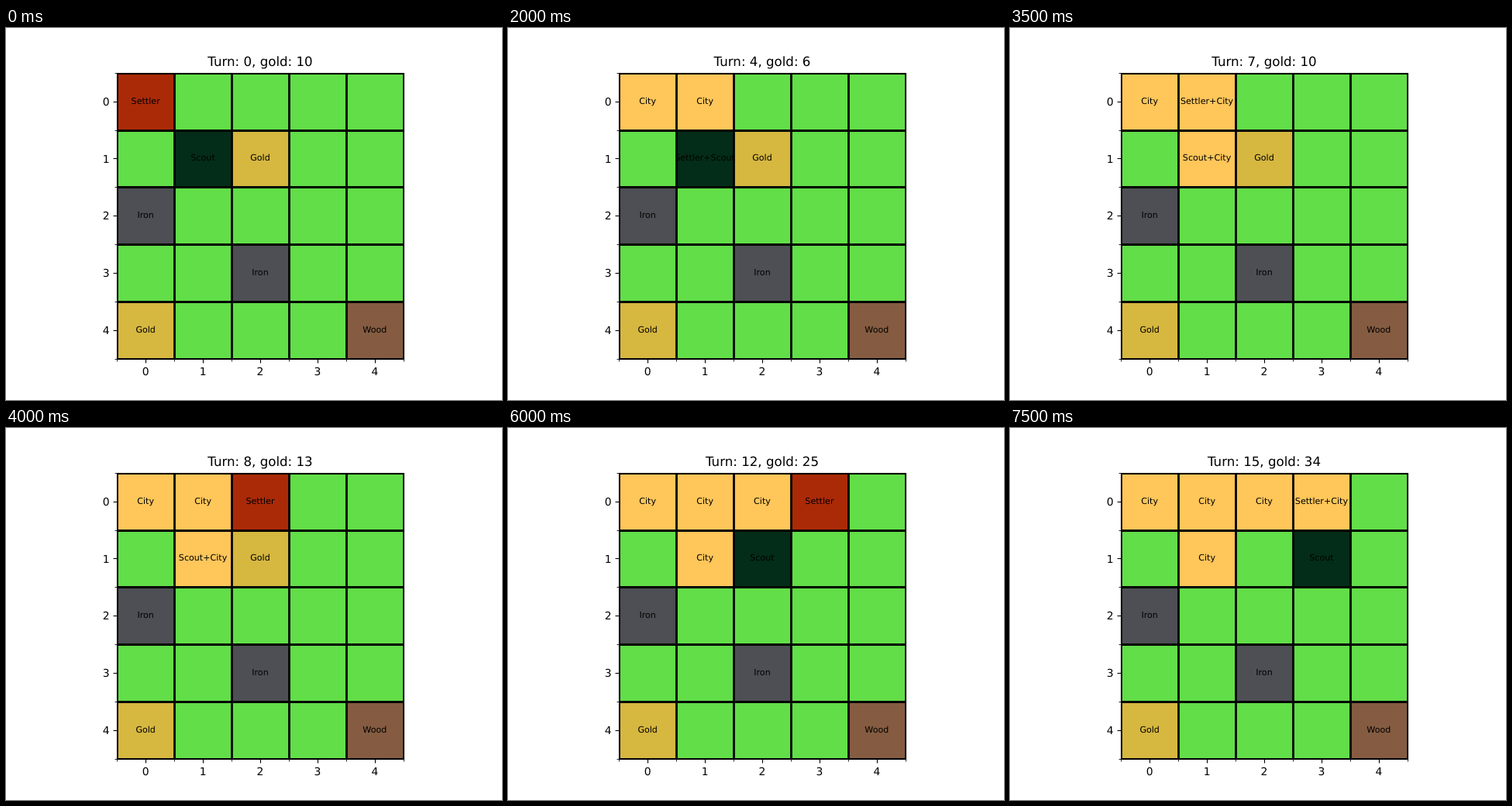
An HTML page that plays this animation: 640 by 480 pixels, repeating every 8000 ms.

```html
<!DOCTYPE html>
<html lang="en">
<head>
<meta charset="utf-8">
<title>Settlers on a grid</title>
<style>
  html, body { margin: 0; width: 100%; height: 100%; overflow: hidden; background: #fff; }
  svg { display: block; }
  text { font-family: "DejaVu Sans", sans-serif; fill: #000; text-rendering: geometricPrecision; white-space: pre; }
  .title { font-size: 16.667px; text-anchor: middle; }
  .tick { font-size: 13.889px; text-anchor: middle; }
  .side { text-anchor: end; }
  .label { font-size: 11.111px; text-anchor: middle; }
</style>
</head>
<body>
<svg id="stage" width="640" height="480" viewBox="0 0 640 480">
  <clipPath id="plot"><rect x="143" y="58" width="371" height="370"/></clipPath>
</svg>
<script>
const STEP = 500, TURNS = 16, N = 5;
const LEFT = 143.2, TOP = 57.6, CELL = 73.92;
const COLORS = {
  land: '#62de49', City: '#ffc65a', Scout: '#032d18', Settler: '#aa2a08',
  Gold: '#d6b740', Iron: '#4e4f54', Wood: '#855c41'
};

// Each entry: turn, row, column
const settlerPath = [[0, 0, 0], [2, 0, 1], [4, 1, 1], [6, 0, 1], [8, 0, 2], [12, 0, 3]];
const scoutPath = [[0, 1, 1], [11, 1, 2], [13, 1, 3]];
const cities = [[1, 0, 0], [3, 0, 1], [5, 1, 1], [9, 0, 2], [14, 0, 3]];
const resources = { '1,2': 'Gold', '2,0': 'Iron', '3,2': 'Iron', '4,0': 'Gold', '4,4': 'Wood' };
const MINED = 11, CITY_COST = 4;

const stage = document.getElementById('stage');

function add(tag, attrs, parent = stage) {
  const el = document.createElementNS('http://www.w3.org/2000/svg', tag);
  for (const key in attrs) el.setAttribute(key, attrs[key]);
  parent.appendChild(el);
  return el;
}

function line(x1, y1, x2, y2, width, parent) {
  return add('line', { x1, y1, x2, y2, stroke: '#000', 'stroke-width': width }, parent);
}

function write(x, y, cls, str = '') {
  const el = add('text', { x, y, class: cls });
  el.textContent = str;
  return el;
}

const snap = v => Math.round(v) + 0.5;
const xAt = c => LEFT + c * CELL;
const yAt = r => TOP + r * CELL;

const plot = add('g', { 'clip-path': 'url(#plot)' });
const cells = [];
for (let r = 0; r < N; r++) {
  for (let c = 0; c < N; c++) {
    const x = Math.round(143 + c * CELL), y = Math.round(57 + r * CELL);
    const rect = add('rect', { x, y, width: 74, height: 74 }, plot);
    cells.push({ r, c, rect });
  }
}

for (let i = 0; i <= N; i++) {
  const x = snap(xAt(i)), y = snap(yAt(i));
  line(x, 57, x, 429, 2.78, plot);
  line(142, y, 515, y, 2.78, plot);
  line(140.5, y, 143.5, y, 0.83);
  line(x, 427.5, x, 430.5, 0.83);
}
add('rect', { x: 143.5, y: 58.5, width: 370, height: 369, fill: 'none', stroke: '#000', 'stroke-width': 1.11 });

for (let i = 0; i < N; i++) {
  const x = xAt(i + 0.5), y = yAt(i + 0.5);
  line(138.5, snap(y), 143.5, snap(y), 1.11);
  line(snap(x), 427.5, snap(x), 432.5, 1.11);
  write(133.5, Math.round(y + 5.05), 'tick side', i);
  write(x, 448, 'tick', i);
}

for (const cell of cells) {
  cell.text = write(xAt(cell.c + 0.5), Math.round(yAt(cell.r + 0.5) + 3), 'label');
}
const title = write(328, 49, 'title');

// Every city pays one gold per turn from the turn after it was founded.
function goldAt(turn) {
  let gold = 10 + (turn >= MINED ? 1 : 0);
  for (const [founded] of cities) {
    if (turn >= founded) gold += turn - founded - CITY_COST;
  }
  return gold;
}

function isAt(path, turn, r, c) {
  const spot = path.filter(p => p[0] <= turn).pop();
  return spot[1] === r && spot[2] === c;
}

function namesIn(turn, r, c) {
  const names = [];
  if (isAt(settlerPath, turn, r, c)) names.push('Settler');
  if (isAt(scoutPath, turn, r, c)) names.push('Scout');
  if (cities.some(([t, cr, cc]) => t <= turn && cr === r && cc === c)) names.push('City');
  if (!names.length) {
    const key = r + ',' + c;
    if (resources[key] && !(key === '1,2' && turn >= MINED)) names.push(resources[key]);
  }
  return names;
}

function draw(turn) {
  title.textContent = `Turn: ${turn}, gold: ${goldAt(turn)}`;
  for (const { r, c, rect, text } of cells) {
    const names = namesIn(turn, r, c);
    rect.setAttribute('fill', COLORS[names[names.length - 1] || 'land']);
    text.textContent = names.join('+');
  }
}

const start = performance.now();
let shown = -1;
function tick() {
  const turn = Math.floor((performance.now() - start) / STEP) % TURNS;
  if (turn !== shown) draw(shown = turn);
  requestAnimationFrame(tick);
}
tick();
</script>
</body>
</html>
```
